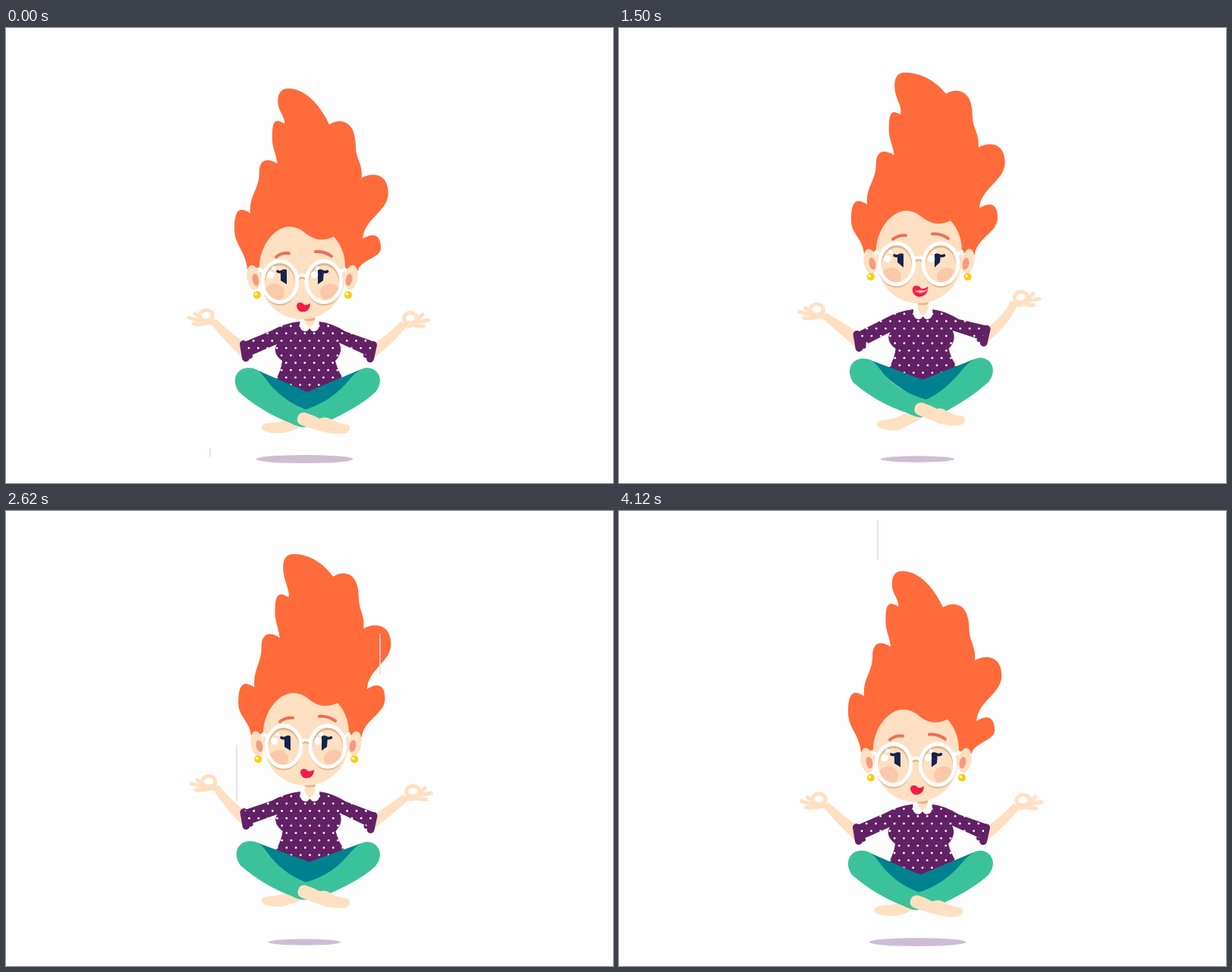
Write an HTML page with a canvas that moves like this. It is 800 by 600 pixels and loops after 4170 ms.

```html
<!DOCTYPE html>
<html lang="en">
<head>
<meta charset="utf-8">
<title>Levitation</title>
<style>
html, body { margin: 0; width: 100%; height: 100%; overflow: hidden; background: #fefefe; }
canvas { display: block; width: 800px; height: 600px; }
</style>
</head>
<body>
<canvas id="stage" width="800" height="600"></canvas>
<script>
const ctx = document.getElementById('stage').getContext('2d');
const LOOP = 4170, STEP = LOOP / 100;
const SKIN = '#ffe0c2', TAN = '#dfb68e', HAIR = '#ff6b3a', PLUM = '#632165', EAR = '#f49b80',
  GREEN = '#3cc29a', TEAL = '#00818f', NAVY = '#17224f', LIP = '#f01e46', BROW = '#ea7058';

let off = {};

// Two bobs per loop, the second higher; each part follows by its own share
function pose(t) {
  const turn = 4 * Math.PI * t / LOOP;
  const bob = (1 - Math.cos(turn)) / 2, sway = Math.sin(turn);
  const lift = (34 + .0065 * t) * bob;
  const arc = Math.sin(Math.PI * t / LOOP), sag = 8 * arc * arc;
  const cross = t < LOOP / 2 ? bob : 0;
  const part = (x, share, tilt = 0, drop = 0) => [x, sag - share * lift + tilt * sway + drop];
  const hx = 5.2 * Math.sqrt(arc), head = part(hx, 1, 0, -sag / 4);
  off = {
    head,
    glass: [hx, head[1] - 4 * bob],
    ringL: [hx - 7 * bob, head[1] - 5 * bob],
    ringR: [hx + 6 * bob, head[1] - 5 * bob],
    neck: [bob, head[1]],
    t: part(bob, .87),
    l: part(bob, .87, -3),
    r: part(bob, .95, 3),
    handL: part(3.3 * sway, .82, -7),
    handR: part(3.3 * sway, 1.02, 8),
    h: part(5 * bob, .88),
    kl: part(3.5 * bob, .72),
    kr: part(0, .72, 1),
    c: part(16 * cross, .75),
    heel: part(8 * cross + 1.5 * bob, .75),
    toe: part(5 * cross, .68),
    back: part(6 * cross, .72, 0, 14 * cross),
    ankle: part(7 * cross, .72, 0, 7 * cross)
  };
  return { lift, smile: cross };
}

// Points may carry a part name: "x,y,part"
function path(s) {
  return new Path2D(s.replace(/(-?[\d.]+),(-?[\d.]+)(?:,(\w+))?/g, (m, x, y, k) => {
    const o = off[k] || [0, 0];
    return `${+x + o[0]} ${+y + o[1]}`;
  }));
}
function fill(color, s) {
  ctx.fillStyle = color;
  ctx.fill(path(s));
}
function stroke(color, width, s) {
  ctx.strokeStyle = color;
  ctx.lineWidth = width;
  ctx.stroke(path(s));
}
function oval(color, x, y, rx, ry = rx, turn = 0) {
  ctx.fillStyle = color;
  ctx.beginPath();
  ctx.ellipse(x, y, rx, ry, turn, 0, 7);
  ctx.fill();
}
function hoop(color, width, x, y, rx, ry = rx) {
  ctx.strokeStyle = color;
  ctx.lineWidth = width;
  ctx.beginPath();
  ctx.ellipse(x, y, rx, ry, 0, 0, 7);
  ctx.stroke();
}
function moved(name, draw) {
  ctx.save();
  ctx.translate(...off[name]);
  draw();
  ctx.restore();
}

// Flame edges from ear to tip: base, then crest and notch in turn
const leftLean = [[318, 318], [301, 270], [322, 249], [334, 197], [358, 184], [351, 150], [368, 132], [358, 97], [371, 80]];
const leftTall = [[318, 320], [303, 280], [327, 255], [309, 202], [334, 185], [335, 145], [375, 128], [382, 88], [400, 68]];
const rightLean = [[464, 320], [494, 281], [470, 268], [504, 208], [469, 188], [461, 146], [426, 117], [371, 80]];
const rightTall = [[464, 322], [499, 268], [479, 254], [486, 204], [440, 178], [449, 150], [428, 133], [400, 68]];

function flameSide(lean, tall, grow, wave, dir) {
  const pts = lean.map(([x, y], i) => {
    const loose = i && i < 7 ? wave : 0;
    return [x + (tall[i][0] - x) * grow, y + (tall[i][1] - y) * grow + loose];
  });
  const tip = pts.length - 1;
  ctx.beginPath();
  ctx.moveTo(...pts[0]);
  for (let i = 1; i <= tip; i++) {
    const [x0, y0] = pts[i - 1], [x, y] = pts[i], h = y0 - y;
    if (i === tip && dir < 0)
      ctx.bezierCurveTo(x0 - 9, y0 - h * .4, x + 27 - 10 * grow, y, x, y);
    else if (i % 2)
      ctx.bezierCurveTo(x0 - dir * 2, y0 - h * .45, x, y + h * .4, x, y);
    else if (i === tip)
      ctx.bezierCurveTo(x0, y0 - h * .6, x - 9, y, x, y);
    else
      ctx.bezierCurveTo(x0, y - 7, x - dir * 13, y - 8, x, y);
  }
  ctx.lineTo(dir > 0 ? 440 : 350, 300);
  ctx.fillStyle = HAIR;
  ctx.fill();
}

function drawHair(t) {
  const a = 8 * Math.PI * t / LOOP;
  const grow = Math.min(1, 1.45 * Math.exp(4 * (Math.cos(a - 4.52) - 1)));
  flameSide(leftLean, leftTall, grow, -5 * Math.cos(a), 1);
  flameSide(rightLean, rightTall, grow, 10 * Math.cos(a), -1);
}

// Rising streaks: time, x, y, length
const streaks = [
  [250, 269, 485, 140], [670, 509, 400, 149], [1170, 459, 458, 92], [1870, 429, 409, 82],
  [2620, 304, 348, 73], [2620, 493, 191, 52], [3120, 523, 280, 51], [4120, 341, 41, 52]
];
function drawStreaks(t) {
  for (const [at, x, y, length] of streaks) {
    const d = t - at, half = length / 2 * (1 - (d / 260) ** 2);
    if (half > 0) stroke('#ead9e4', 1.6, `M${x},${y - .3 * d - half} L${x},${y - .3 * d + half}`);
  }
}

function drawArms() {
  fill(SKIN, 'M269,389,handL L277,384,handL Q297,403,l 316,416,l L313,436,l Q292,417,l 269,389,handL Z');
  fill(SKIN, 'M520,387,handR L528,393,handR Q514,412,r 485,435,r L484,417,r Q506,402,r 520,387,handR Z');
  moved('handL', () => {
    hoop(SKIN, 5, 264, 379.5, 8.5, 7.5);
    oval(SKIN, 268, 387, 8, 4.5);
    stroke(SKIN, 5, 'M262,387 Q250,385 241,382 M264,389 Q254,392 247,390 M259,384 L249,377');
  });
  moved('handR', () => {
    hoop(SKIN, 5, 533, 383, 8.5, 7.5);
    oval(SKIN, 530, 391, 8, 4.5);
    stroke(SKIN, 5, 'M537,388 Q548,387 557,385 M535,391 Q544,394 550,393 M540,386 L549,378');
  });
}

function drawTorso() {
  const shirt = path('M387,387,t Q368,389,t 350,399,t L314,414,l L320,433,l L357,417,t ' +
    'Q350,428,t 364,439,t Q363,450,t 355,465,t L397,486,h L445,463,t Q437,452,t 434,439,t ' +
    'Q445,427,t 439,415,t L476,432,r L486,414,r L447,400,t Q430,389,t 412,387,t Z');
  ctx.fillStyle = PLUM;
  ctx.fill(shirt);
  stroke(PLUM, 10, 'M313,417,l L316,435,l M484,418,r L480,436,r');
  stroke(PLUM, 6, 'M318,420,l L322,433,l M479,420,r L474,432,r');
  ctx.save();
  ctx.clip(shirt);
  ctx.translate(...off.t);
  for (let row = 0; row < 11; row++)
    for (let i = -8; i < 9; i++)
      oval('#fff', 400 + i * 12.3 + (row % 2) * 6.15, 393 + row * 9.7, 1.4);
  ctx.restore();
  moved('t', () => fill(SKIN, 'M393,368 L407,368 L407,390 L400,397 L393,390 Z'));
  moved('neck', () => fill(TAN, 'M393,378 L407,378 L407,385 Q400,388 393,385 Z'));
  moved('t', () => fill('#fff', 'M388,384 Q385,399 394,400 Q399,400 400,395 Q394,392 393,385 Z ' +
    'M412,384 Q415,399 406,400 Q401,400 400,395 Q406,392 407,385 Z'));
}

function drawLegs() {
  fill(SKIN, 'M392,511,ankle L375,515,ankle Q362,520,back 345,521,back Q334,523,back 337,529,back ' +
    'Q345,536,back 365,534,back Q380,531,ankle 394,523,ankle Z');
  fill(TEAL, 'M326,449,kl L397,480,h L468,450,kr Q440,490,c 395,506,c Q355,490,c 326,449,kl Z');
  fill(GREEN, 'M475,448,kr Q465,449,kr 453,463,kr Q430,492,kr 395,503,c L388,518,heel L402,526,heel ' +
    'Q420,521,heel 428,517,heel Q468,498,kr 487,480,kr C499,466,kr 492,448,kr 475,448,kr Z');
  fill(GREEN, 'M320,448,kl Q332,448,kl 341,461,kl Q361,490,kl 395,503,c L410,508,heel L396,526,heel ' +
    'Q388,528,heel 375,521,heel Q338,507,kl 307,480,kl C296,464,kl 304,448,kl 320,448,kl Z');
  fill(SKIN, 'M384,514,heel Q386,506,heel 394,507,heel Q404,510,heel 413,515,heel ' +
    'Q422,511,toe 430,517,toe Q440,522,toe 451,523,toe Q456,529,toe 449,534,toe ' +
    'Q438,537,toe 420,533,toe Q404,529,heel 390,524,heel Q382,521,heel 384,514,heel Z');
}

function drawMouth(smile) {
  ctx.save();
  ctx.translate(392, 368);
  ctx.scale(1 + .25 * smile, 1 + .3 * smile);
  ctx.translate(-392, -368);
  fill(LIP, 'M383,367 Q383,362 388,362 Q391,362 393,365 Q397,366 401,363 Q401,372 394,374 Q385,376 383,367 Z');
  ctx.globalAlpha = smile;
  fill('#fff', 'M385,369 Q389,366 393,367 Q397,368 401,365 Q397,371 391,370 Q388,369 385,369 Z');
  ctx.restore();
}

function drawEyes(smile) {
  const cut = 333 - 5 * smile, tip = 338 - 2 * smile;
  stroke(NAVY, 3.6, 'M358,321 Q361,322.5 365,321 M423.5,321 Q420,322.5 416,321');
  fill(NAVY, `M362,320 Q366,317 370,319 L370,${tip} L362,${cut} Z`);
  fill(NAVY, `M419,320 Q415,317 411,319 L411,${tip} L418,${cut} Z`);
}

function drawHead(smile) {
  moved('head', () => {
    for (const side of [-1, 1]) {
      oval(SKIN, 390.5 + 64.5 * side, 329, 8.5, 16.5, .15 * side);
      oval(EAR, 390.5 + 61.5 * side, 332, 4.2, 8, .2 * side);
    }
    fill(SKIN, 'M334,315 C334,290 352,262 374,262 C392,262 396,278 415,279 Q424,279 432,275 ' +
      'C441,285 447,298 447,315 L447,326 C447,360 420,384 390,384 C358,384 335,358 334,326 Z');
    drawMouth(smile);
  });
  for (const [name, x] of [['ringL', 331], ['ringR', 451]])
    moved(name, () => {
      oval('#ffcc0a', x, 352, 5);
      oval('#fff', x - 1.5, 351, 1.8);
    });
  moved('glass', () => {
    stroke(BROW, 4, 'M356,302 Q363,296 373,297 M408,295 Q420,294 429,301');
    for (const x of [361, 419]) hoop(TAN, 4, x, 337.5, 22, 26.5);
    stroke(TAN, 3, 'M385,331 Q390,327 395,331');
  });
  for (const [x, cheek] of [[361, 354], [419, 427]]) {
    ctx.save();
    ctx.beginPath();
    ctx.ellipse(x + off.glass[0], 334.5 + off.glass[1], 22, 27, 0, 0, 7);
    ctx.clip();
    ctx.translate(...off.head);
    oval('#fac8ab', cheek, 349, 13, 12);
    ctx.restore();
  }
  moved('head', () => {
    drawEyes(smile);
    for (const x of [349, 406.5]) {
      oval('#fff', x, 325.5, 4.8);
      oval('#fff', x + 4, 316.5, 2.6);
    }
  });
  moved('glass', () => {
    for (const x of [361, 419]) hoop('#fff', 5, x, 334.5, 22.8, 27);
    stroke('#fff', 4, 'M384,328 Q390,324 396,328 M339,322 L334,318 M441,322 L447,318');
  });
}

function draw(t) {
  const { lift, smile } = pose(t);
  const width = 128 - 1.18 * lift;
  ctx.lineCap = ctx.lineJoin = 'round';
  ctx.fillStyle = '#fefefe';
  ctx.fillRect(0, 0, 800, 600);
  oval('#cebdd3', 393.5, 568.5, width / 2, width * .043);
  moved('head', () => drawHair(t));
  drawArms();
  drawTorso();
  drawStreaks(t);
  drawLegs();
  drawHead(smile);
}

const start = performance.now();
function tick() {
  const t = (performance.now() - start) % LOOP;
  draw(Math.floor((t + 10) / STEP) % 100 * STEP);
  requestAnimationFrame(tick);
}
tick();
</script>
</body>
</html>
```
